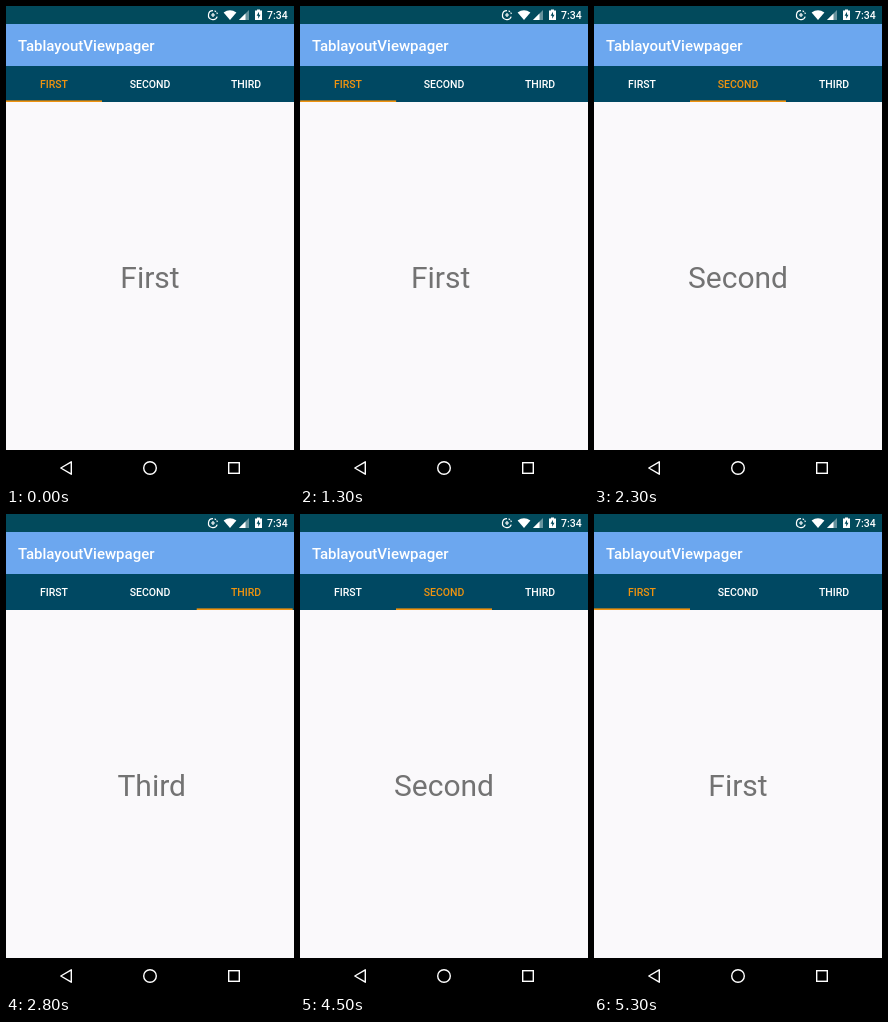
An HTML page for the animation above (5.5 s loop, 288x480 px).

```html
<!DOCTYPE html>
<html lang="en">
<head>
<meta charset="utf-8">
<title>Swipeable tabs</title>
<style>
  html, body { margin: 0; width: 100%; height: 100%; overflow: hidden; background: #faf9fb; }
  svg { display: block; width: 288px; height: 480px; font-family: Roboto, sans-serif; }
  .title { font-size: 15px; font-weight: 500; fill: #fff; }
  .clock { font-size: 10.5px; font-weight: 500; fill: #fff; }
  .tab { font-size: 10.5px; font-weight: 500; fill: #fff; text-anchor: middle; }
  .tab.on { fill: #ef930f; }
  .page { font-size: 30px; fill: #737373; text-anchor: middle; }
  .line { fill: none; stroke: #fff; }
</style>
</head>
<body>
<svg viewBox="0 0 288 480">
  <rect width="288" height="480" fill="#faf9fb"/>
  <g id="pages"></g>

  <!-- status bar -->
  <rect width="288" height="18" fill="#024a5c"/>
  <g class="line" stroke-width="1.2">
    <path d="M207 4.6A4.5 4.5 0 1 0 211.2 10.6"/>
    <path d="M208.6 4.9A4.5 4.5 0 0 1 211.5 9" stroke-dasharray="1.6 1"/>
    <path d="M205 9h4M207 7v4"/>
  </g>
  <path d="M217.6 6.6Q224 1.8 230.4 6.6L224 14Z" fill="#fff"/>
  <path d="M233 14L243 4V14Z" fill="#fff" opacity=".4"/>
  <path d="M233 14L239.5 7.5V14Z" fill="#fff"/>
  <path d="M249 4.6h2V3.5h3v1.1h2V14h-7Z" fill="#fff"/>
  <path d="M253 5.8L250.6 9.8H252.2V12.8L254.5 8.8H253Z" fill="#024a5c"/>
  <text class="clock" x="261" y="13">7:34</text>

  <!-- toolbar and tabs -->
  <rect y="18" width="288" height="42" fill="#6ca7ef"/>
  <text class="title" x="12" y="45">TablayoutViewpager</text>
  <rect y="60" width="288" height="36" fill="#004862"/>
  <g id="tabs"></g>
  <rect id="bar" y="94.4" width="96" height="1.6" fill="#ef930f"/>

  <!-- navigation bar -->
  <rect y="444" width="288" height="36" fill="#000"/>
  <g class="line" stroke-width="1.4">
    <path d="M65.3 455.8V468.2L54.8 462Z" stroke-linejoin="round"/>
    <circle cx="144" cy="462" r="6.3"/>
    <rect x="222.7" y="456.7" width="10.6" height="10.6"/>
  </g>
</svg>
<script>
const LOOP = 5500, STEP = 100, PAGE = 288, TAB = 96, LAG = 32;
const NAMES = ["First", "Second", "Third"];

// Each swipe drags from one page up to `grab`, then settles on the next.
const SWIPES = [
  { start: 1250, release: 1440, end: 1801, from: 0, grab: 0.17, to: 1 },
  { start: 2350, release: 2510, end: 2980, from: 1, grab: 1.272, to: 2 },
  { start: 3370, release: 3530, end: 4000, from: 2, grab: 1.714, to: 1 },
  { start: 4570, release: 4730, end: 5200, from: 1, grab: 0.714, to: 0 }
];

function addText(parent, cls, label, y) {
  const el = document.createElementNS("http://www.w3.org/2000/svg", "text");
  el.setAttribute("class", cls);
  el.setAttribute("y", y);
  el.textContent = label;
  document.getElementById(parent).append(el);
  return el;
}

const pages = NAMES.map(name => addText("pages", "page", name, 282));
const tabs = NAMES.map((name, i) => {
  const el = addText("tabs", "tab", name.toUpperCase(), 82);
  el.setAttribute("x", TAB * (i + 0.5));
  return el;
});
const bar = document.getElementById("bar");

function position(t) {
  let p = 0;
  for (const s of SWIPES) {
    if (t < s.start) break;
    if (t < s.release) {
      const k = (t - s.start) / (s.release - s.start);
      p = s.from + (s.grab - s.from) * k * k;
    } else {
      const left = Math.max(0, (s.end - t) / (s.end - s.release));
      p = s.to + (s.grab - s.to) * left ** 5;
    }
  }
  return p;
}

function draw(now) {
  const t = Math.floor((now % LOOP) / STEP) * STEP;
  const p = position(t);
  const barPos = position(t - LAG);
  pages.forEach((el, i) => el.setAttribute("x", PAGE * (i - p + 0.5)));
  tabs.forEach((el, i) => el.classList.toggle("on", i === Math.round(barPos)));
  bar.setAttribute("x", TAB * barPos);
}

const origin = performance.now();
function tick() {
  draw(performance.now() - origin);
  requestAnimationFrame(tick);
}
tick();
</script>
</body>
</html>
```
